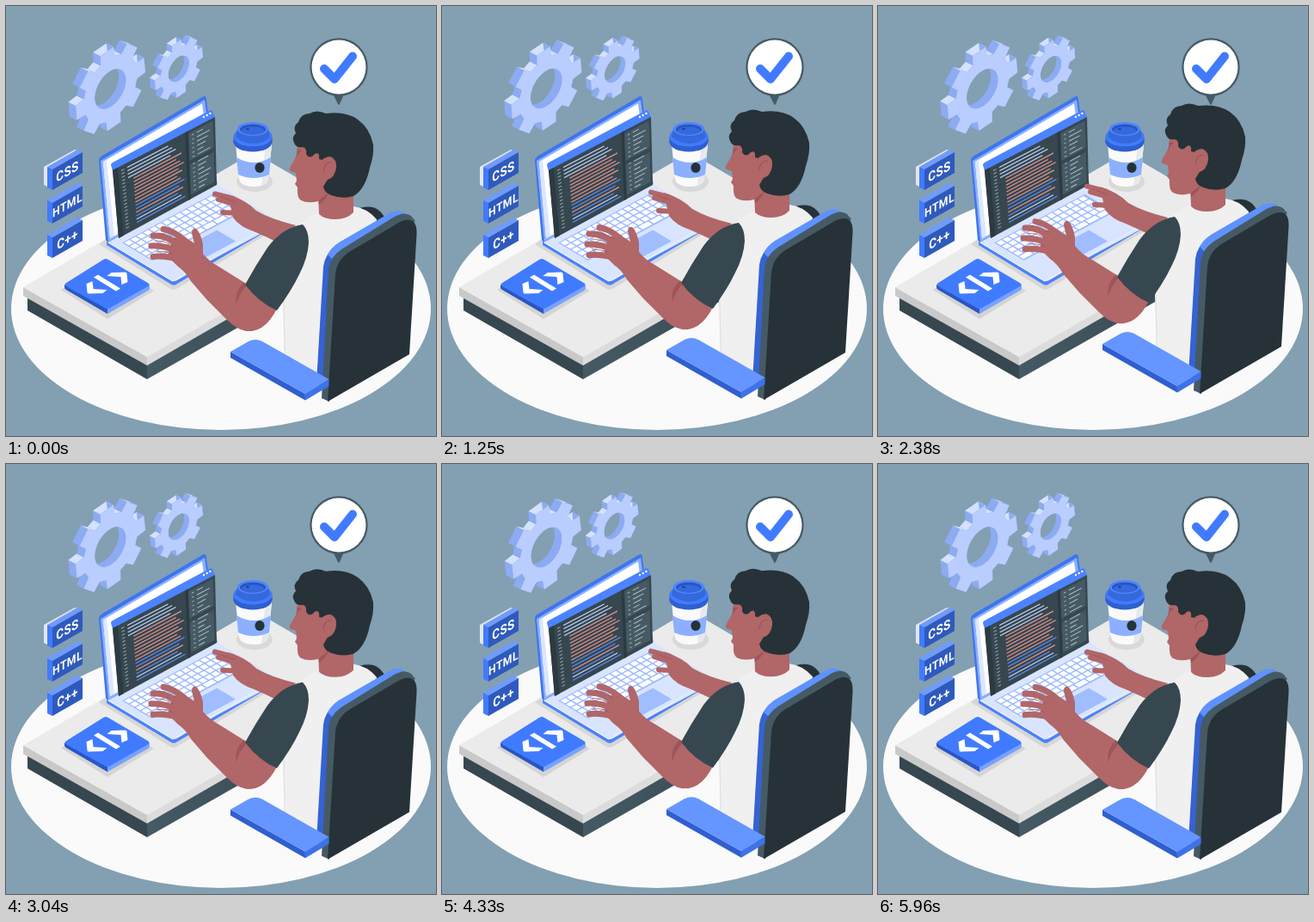
Animation, 500 px wide and 500 px high, one loop 6 s. Source, as an HTML page with a canvas:

```html
<!DOCTYPE html>
<html lang="en">
<head>
<meta charset="utf-8">
<title>Developer at a desk</title>
<style>
html, body { margin: 0; width: 100%; height: 100%; overflow: hidden; background: #839fb2; }
canvas { display: block; width: 500px; height: 500px; }
</style>
</head>
<body>
<canvas id="stage" width="500" height="500"></canvas>
<script>
const ctx = document.getElementById('stage').getContext('2d');
const BG = '#839fb2', BLUE = '#407bff', DARK = '#263238', SLATE = '#37474f';
const SKIN = '#b16668', SHADE = '#9d5558';
const TAU = Math.PI * 2, LOOP = 6000, BOB = 1500, LEAD = 30;

function fill(color, d) {
  ctx.fillStyle = color;
  ctx.fill(new Path2D(d));
}

function line(color, width, d) {
  ctx.strokeStyle = color;
  ctx.lineWidth = width;
  ctx.lineCap = ctx.lineJoin = 'round';
  ctx.stroke(new Path2D(d));
}

function oval(color, x, y, rx, ry) {
  ctx.fillStyle = color;
  ctx.beginPath();
  ctx.ellipse(x, y, rx, ry, 0, 0, TAU);
  ctx.fill();
}

function trace(points) {
  ctx.beginPath();
  for (const [x, y] of points) ctx.lineTo(x, y);
  ctx.closePath();
}

function poly(color, points) {
  ctx.fillStyle = color;
  trace(points);
  ctx.fill();
}

// ---- floor and desk ----
function drawRoom() {
  ctx.fillStyle = BG;
  ctx.fillRect(0, 0, 500, 500);
  oval('#fafafa', 250, 352, 244, 141);

  fill('#37474f', 'M25 336L164 416V434L25 354Z');
  const side = ctx.createLinearGradient(164, 0, 330, 0);
  side.addColorStop(0, '#455a64');
  side.addColorStop(1, '#3a4c55');
  fill(side, 'M164 416L345 312V331L164 434Z');
  fill('#c9c9c9', 'M20 327L164 408V418L20 337Z');
  fill('#dcdcdc', 'M164 408L431 254V264L164 418Z');
  fill('#ebebeb', 'M20 327L284 172.5Q288 170 292 172.5L431 254L164 408Z');
}

// ---- gears ----
const onWall = (cx, cy, r, a) => {
  const u = r * Math.cos(a), v = r * Math.sin(a);
  return [cx + u * .866, cy + v - u * .5];
};

function drawGear(cx, cy, r, hole, depth) {
  const rim = [], ring = [], step = TAU / 8, start = -6 * Math.PI / 180;
  for (let i = 0; i < 8; i++) {
    const a = start + i * step;
    for (const [k, off] of [[.77, -.27], [1, -.19], [1, .19], [.77, .27]])
      rim.push(onWall(cx, cy, r * k, a + off));
  }
  for (let i = 0; i < 48; i++) ring.push(onWall(cx, cy, hole, i * TAU / 48));
  const back = ([x, y]) => [x - depth, y - depth * .5];

  rim.forEach((p, i) => {
    const q = rim[(i + 1) % rim.length];
    const up = q[0] - p[0] > Math.abs(q[1] - p[1]) * .7;
    poly(up ? '#d5e2ff' : '#8cabf3', [p, q, back(q), back(p)]);
  });
  poly('#b9cdff', rim);
  ctx.save();
  trace(ring);
  ctx.clip();
  poly('#8cabf3', ring);
  poly(BG, ring.map(back));
  ctx.restore();
}

function drawGears(t) {
  ctx.save();
  ctx.translate(150, 93);
  ctx.rotate(Math.sin(t / LOOP * TAU) * Math.PI / 180);
  ctx.translate(-150, -93);
  drawGear(121.5, 96.5, 47, 21, 8.5);
  drawGear(201, 73, 32.5, 14, 6);
  ctx.restore();
}

// ---- language labels ----
function drawLabel(text, y, size) {
  fill('#6f9bff', `M48 ${y - 3}L83 ${y - 23}L89 ${y - 20}L54 ${y}Z`);
  fill(BLUE, `M48 ${y - 3}L54 ${y}V${y + 24}L48 ${y + 21}Z`);
  fill('#2f5abd', `M54 ${y}L89 ${y - 20}V${y + 4}L54 ${y + 24}Z`);
  ctx.save();
  ctx.transform(.866, -.5, 0, 1, 71.5, y + 2);
  ctx.font = `700 ${size}px Roboto, Arial, sans-serif`;
  ctx.letterSpacing = '0.5px';
  ctx.textAlign = 'center';
  ctx.textBaseline = 'middle';
  ctx.fillStyle = '#fff';
  ctx.fillText(text, 0, 1);
  ctx.restore();
}

function drawLabels() {
  fill('#e6e6e6', 'M44 187L80 167L83 168L48 188V210L44 208Z');
  drawLabel('CSS', 190, 15.5);
  drawLabel('HTML', 229, 14);
  drawLabel('C++', 269, 15.5);
}

function drawTile() {
  fill('#d4d4d4', 'M64 330L118 364L172 331L116 297Z');
  fill('#2a56c2', 'M68 324L118 352V358L70 330Q68 329 68 327Z');
  fill('#79a2ff', 'M118 352L167 324V328Q167 330 165 331L118 358Z');
  fill(BLUE, 'M70 322L113 295Q116 293 119 295L165 322Q168 324 165 326L121 351Q118 353 115 351L70 326Q67 324 70 322Z');
  for (const s of [1, -1]) {
    ctx.save();
    ctx.translate(117.5, 322);
    ctx.scale(s, s);
    fill('#fff', 'M-24 1L-17 -2L-16 7L0 8L-5 12L-21 12.5Q-23 12.5 -23 11Z');
    ctx.restore();
  }
  fill('#fff', 'M102 315.5L107 312.5L133 328.5L128 331.5Z');
}

// ---- laptop ----
const deck = (a, b) => [118 + 127 * a + 75 * b, 275 - 68 * a + 45 * b];
const deckRect = (a0, b0, a1, b1) => [deck(a0, b0), deck(a1, b0), deck(a1, b1), deck(a0, b1)];

const pane = (u, v) => {
  const x0 = 124 + 7 * v, x1 = 243 + 2 * v;
  const y0 = 191 + 79 * v, y1 = 129 + 79 * v;
  return [x0 + (x1 - x0) * u, y0 + (y1 - y0) * u];
};
const paneRect = (u0, v0, u1, v1) => [pane(u0, v0), pane(u1, v0), pane(u1, v1), pane(u0, v1)];

function codeColor(i) {
  if (i < 4) return '#c6d7ff';
  if (i < 12 || i == 14) return '#e8938d';
  return i == 16 ? '#c6d7ff' : '#5c8fff';
}

function drawCode() {
  poly(SLATE, paneRect(0, 0, 1, 1));
  poly('#2c3a41', paneRect(0, 0, .05, 1));
  poly('#2c3a41', paneRect(.71, 0, .735, 1));
  poly('#455a64', paneRect(.74, .04, .98, .44));
  poly('#455a64', paneRect(.74, .5, .98, .94));

  for (let i = 0; i < 18; i++) {
    const v = .06 + i * .05;
    const end = (i < 4 ? .54 : .61) + (i * 7 % 5) * .018;
    poly('#90a4ae', paneRect(.08, v, .11, v + .014));
    poly(codeColor(i), paneRect(i < 4 ? .14 : .19, v, end, v + .016));
  }
  for (let i = 0; i < 13; i++) {
    const v = .08 + i * .064 + (i > 5 ? .04 : 0);
    poly('#9fb0b8', paneRect(.77, v, .79, v + .014));
    poly('#b0bec5', paneRect(.82, v, .88 + (i * 3 % 4) * .022, v + .014));
  }
}

function drawLaptop() {
  fill('#d6d6d6', 'M108 277L118 270L200 318L320 250L324 253L198 329Q194 331 190 328Z');

  // lid
  fill('#3e75ef', 'M108 180Q108 176 112 174L228 106Q233 103 233 109L246 210L120 276L116 272Z');
  fill('#8cb0ff', 'M110 180L231 109L244 209L119 274Z');
  fill('#fff', 'M113 181L228 113.5L241 208L121 270Z');
  fill('#dce7ff', 'M113 181L117 179L126 267L121 270Z');

  // base
  fill('#4b82fb', 'M117 273L193 319Q196 321 199 319L318 249V253L199 323Q195 326 191 323L117 278Z');
  poly('#d9e5ff', deckRect(0, 0, 1, 1));
  line('#f0f5ff', 1, 'M119 275L194 320L316 249.5');
  poly('#9dbaff', deckRect(.07, .11, .9, .57));
  for (let r = 0; r < 5; r++) {
    const b = .125 + r * .088, n = r == 4 ? 8 : 14;
    for (let i = 0; i < n; i++) {
      const a = .08 + i * .81 / n;
      poly('#fff', deckRect(a, b, a + .81 / n - .012, b + .07));
    }
  }
  poly('#9fbdff', deckRect(.36, .63, .63, .92));

  // editor window
  fill('#4c83ff', 'M122 185Q122 183 124 182L237 121.5Q240 120 240.5 123L243 130L124 192Z');
  for (let i = 0; i < 3; i++) oval('#fff', 230 + i * 3.7, 129 - i * 2, 1.2, 1.3);
  drawCode();
}

// ---- cup and check bubble ----
function drawCup() {
  oval('#d9d9d9', 289, 204, 21, 12);
  fill('#fafafa', 'M267 160L271 202Q274 210 288 210Q302 210 305 202L309 160Z');
  fill('#e6e9ed', 'M301 168L309 162L305 202Q303 207 297 209Z');
  fill('#8cb0ff', 'M268 176Q288 188 308 176L306 196Q288 204 270 196Z');
  oval(DARK, 295, 188, 5.6, 6);
  oval('#2f5fd0', 287, 158, 22.5, 11.5);
  fill('#2f5fd0', 'M264.5 152H309.5V159H264.5Z');
  oval(BLUE, 287, 152, 22.5, 11.5);
  fill('#3568db', 'M269 143L267 152Q276 160 288 160Q300 160 307 152L305 143Z');
  oval('#4f86ff', 287, 143, 18, 8);
  oval('#2a55c0', 287, 143.5, 15, 6);
  oval('#3668dd', 287, 145, 13, 4.5);
  oval('#1f3f92', 281, 143, 2, 1);
}

function drawBubble() {
  fill('#455a64', 'M379 100L386 114Q387 116 388 114L394 100Z');
  oval('#455a64', 387, 71, 33.7, 33.7);
  oval('#fff', 387, 71, 31.5, 31.5);
  line(BLUE, 10, 'M370 73L382 85L403 58.5');
}

// ---- person and chair ----
function drawFarArm() {
  fill(SKIN, 'M258 219Q280 226 291 238Q308 248 337 255L318 276Q302 268 288 262Q272 257 264 246Z');
  line(SKIN, 6, 'M243 218.5L264 224M247 225L268 231M252 240L270 241');
  line(SHADE, .8, 'M250 222L266 228');
}

function drawHead() {
  fill(SKIN, 'M363 215L404 210V240Q396 248 383 248Q370 248 364 242Z');
  fill(SHADE, 'M363 224L376 215Q373 225 364 231Z');
  fill(SKIN, 'M341 151Q338 164 338 174L330 188Q329 192 332 192.5L337 194L338 203L336 207L339 211Q338 223 343 226Q351 230 363 227L378 215L385 175L360 145Z');
  fill(SHADE, 'M337 178L339 167L344 168Q339 172 337 178Z');
  fill(DARK, 'M336 161Q331 153 337 148Q333 140 340 135Q343 125 353 125Q361 120 372 125Q395 122 409 132Q423 142 427 161Q428 174 423 188Q418 213 404 221Q392 225 378 220Q370 217 369 210L375 200L372 180L364 178Q365 169 359 172Q353 179 349 172Q350 164 344 164Q339 165 336 161Z');
  fill(SKIN, 'M364 185Q368 175 377 175Q385 178 384 188Q382 200 374 202Q366 204 363 197Z');
  line(SHADE, 1.3, 'M369 192Q370 182 378 182');
}

function drawNearArm() {
  fill(SKIN, 'M216 264Q216 258 221 259Q226 263 229 277L229 288Q236 297 249 304L281 324L316 350Q308 367 297 374Q289 379 279 378Q268 376 257 365L234 342L215 320Q209 309 200 303L188 291L194 270L207 268L219 276Z');
  line(SKIN, 7, 'M183 259.5Q194 261 207 272M171 267Q186 266 200 278M169 279Q184 278 200 286M171 291.5Q184 290 202 295');
  line(SHADE, .8, 'M177 264Q190 265 199 273M174 273Q186 273 194 279M175 286Q186 284 194 289');
  fill(SHADE, 'M277 321Q265 332 268 347Q270 336 279 326Z');
}

function drawBody() {
  fill(DARK, 'M411 235Q426 231 434 238Q440 243 442 251L420 262Z');
  fill('#f0f0f0', 'M341 254Q352 245 364 240Q365 247 383 247Q399 247 404 233Q420 235 431 248L428 300L376 445L340 428L324 408L322 345Z');
  line('#dedede', 1, 'M323 345L324 404');
  drawHead();
  drawNearArm();
  fill(SLATE, 'M345 254Q352 261 352 275Q351 293 341 312Q332 331 315 354Q294 345 278 324Q290 302 304 281Q321 258 345 254Z');
}

function drawChair() {
  fill('#3563d4', 'M361 438L369 303Q371 288 384 278L392 284L375 452Z');
  fill('#5f92ff', 'M374 289Q378 281 387 275L444 242Q456 235 464 241L459 247L390 287L382 297Z');
  fill('#455a64', 'M367 456L375 306Q377 292 390 283L450 246Q463 238 471 244L476 250L390 310L376 460Z');
  fill(DARK, 'M374 460L383 312Q385 295 399 286L455 253Q467 246 474 251Q478 255 477.5 266L469 405Z');
  fill('#2f5fd0', 'M261 402L348 451V458.5L261 409Z');
  fill('#3d72e8', 'M347 451L375.5 434V442L348 458.5Z');
  fill('#6595ff', 'M261 402L282 390Q290 386 298 390L375.5 434L348 451Z');
}

function draw(t) {
  drawRoom();
  drawGears(t);
  drawLabels();
  drawTile();
  drawCup();
  drawLaptop();
  drawBubble();
  ctx.save();
  ctx.translate(0, -5 * (1 - Math.cos((t + LEAD) / BOB * TAU)));
  drawFarArm();
  drawBody();
  drawChair();
  ctx.restore();
}

function tick() {
  draw(performance.now() % LOOP);
  requestAnimationFrame(tick);
}
tick();
</script>
</body>
</html>
```
